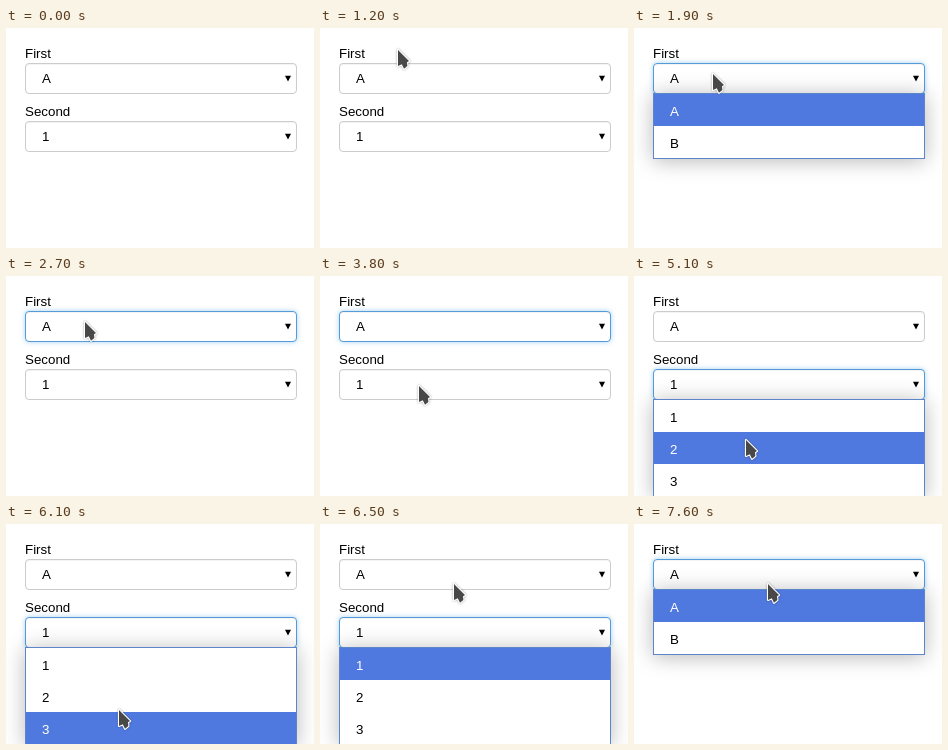
Animation, 308 px wide and 220 px high, one loop 8 s. Source, as an HTML page:

```html
<!DOCTYPE html>
<html lang="en">
<head>
<meta charset="utf-8">
<title>Two select boxes</title>
<style>
html, body { margin: 0; width: 100%; height: 100%; overflow: hidden; background: #fff; }
body { position: relative; font: 13.33px/15px "Liberation Sans", Arial, sans-serif; color: #000; }
body > * { position: absolute; box-sizing: border-box; left: 19px; }
.select, .popup { width: 272px; border: 1px solid #ccc; }
.select {
  height: 31px; padding-left: 16px; line-height: 29px;
  border-radius: 4px; background: #fff;
  box-shadow: inset 0 1px 1px rgba(0,0,0,.05);
}
.select.focus {
  border-color: #559bd8;
  box-shadow: inset 0 1px 1px rgba(0,0,0,.05), 0 0 5px rgba(81,167,232,.5);
}
.select svg { position: absolute; left: 258px; top: 11px; }
.popup {
  border-color: #5d85cc; background: #fff; z-index: 1;
  box-shadow: 0 2px 20px rgba(0,0,0,.28);
}
.popup div { height: 32px; line-height: 35px; padding-left: 16px; }
.popup .on { background: #5079e0; color: #fff; }
#cursor { left: 0; top: 0; z-index: 2; overflow: visible; }
</style>
</head>
<body>
<svg id="cursor" width="14" height="24">
  <path d="M0 0V16L3.8 14.2L6 18.8L9.4 16L9 12.2L11 11Z" fill="#484848"
    stroke="#fff" stroke-width="2.2" stroke-linejoin="round" paint-order="stroke"
    style="filter: drop-shadow(0 0 1px rgba(0,0,0,.35))"/>
</svg>
<script>
const LOOP = 8000, STEP = 100;
const ROW = 32, HOTSPOT = 8;

// Odd clicks open a list, even clicks close it; the fields take turns.
const clicks = [1900, 2700, 4100, 7000, 7600];

const moves = [
  { from: 1000, to: 1200, x: 78, y: 22 },
  { from: 1300, to: 1500, x: 79, y: 46 },
  { from: 3200, to: 3400, x: 77, y: 125 },
  { from: 3700, to: 3800, x: 99, y: 110 },
  { from: 3800, to: 3900, x: 114, y: 105 },
  { from: 4700, to: 5100, x: 112, y: 164 },
  { from: 5400, to: 5900, x: 111, y: 201 },
  { from: 6000, to: 6500, x: 134, y: 60 }
];

const clamp = (v, lo, hi) => Math.min(hi, Math.max(lo, v));
const smooth = p => p * p * (3 - 2 * p);

function pointerAt(t) {
  let x = 77, y = -24;
  for (const m of moves) {
    const k = smooth(clamp((t - m.from) / (m.to - m.from), 0, 1));
    x += (m.x - x) * k;
    y += (m.y - y) * k;
  }
  return { x: Math.round(x), y: Math.round(y) };
}

function add(className, top, html) {
  const el = document.createElement("div");
  el.className = className;
  el.style.top = top + "px";
  el.innerHTML = html;
  document.body.append(el);
  return el;
}

function makeField(label, top, options) {
  add("label", top - 17, label);
  const arrow = '<svg width="8" height="7"><path d="M1 .8H7L4 6.4Z"/></svg>';
  return {
    top: top + 30,
    select: add("select", top, options[0] + arrow),
    popup: add("popup", top + 30, options.map(o => `<div>${o}</div>`).join(""))
  };
}

const fields = [makeField("First", 35, ["A", "B"]), makeField("Second", 93, ["1", "2", "3"])];
const cursor = document.getElementById("cursor");

function draw(now) {
  const t = Math.floor(now % LOOP / STEP) * STEP;
  const { x, y } = pointerAt(t);
  cursor.style.transform = `translate(${x}px, ${y}px)`;

  const count = clicks.filter(c => c <= t).length;
  const focused = count ? Math.floor((count - 1) / 2) % 2 : -1;
  const open = count % 2 === 1;

  fields.forEach(({ top, select, popup }, i) => {
    const items = [...popup.children];
    const row = clamp(Math.floor((y + HOTSPOT - top - 1) / ROW), 0, items.length - 1);
    select.classList.toggle("focus", i === focused);
    popup.style.display = open && i === focused ? "block" : "none";
    items.forEach((item, k) => item.classList.toggle("on", k === row));
  });
  requestAnimationFrame(draw);
}
draw(performance.now());
</script>
</body>
</html>
```
